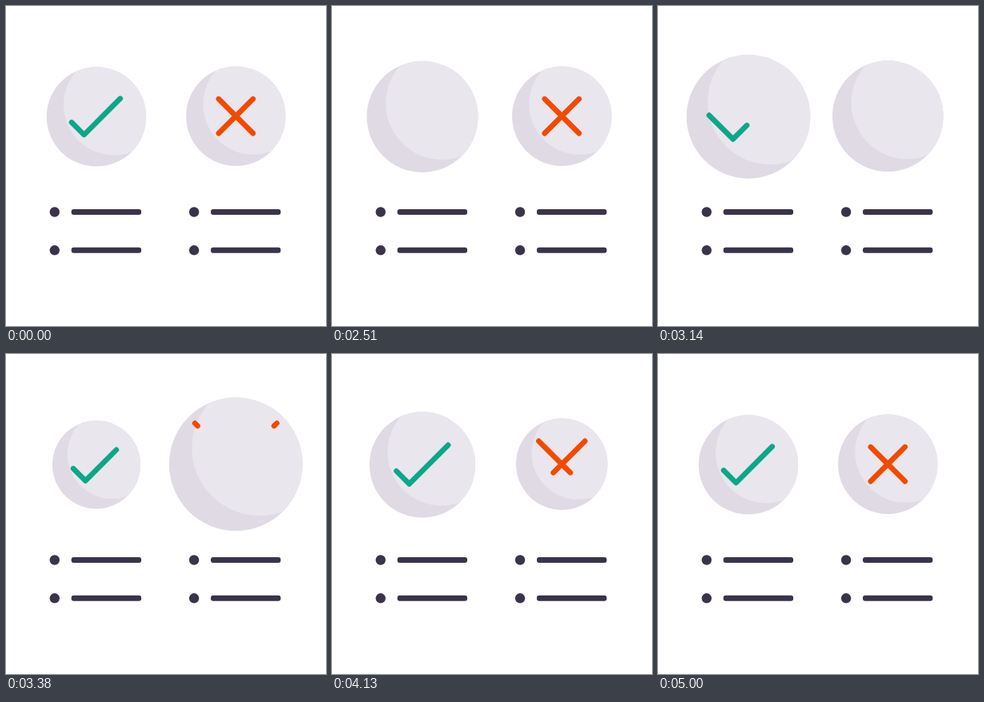
Write an HTML page that moves like this. It is 400 px wide and 400 px high and loops after 5030 ms.

```html
<!DOCTYPE html>
<html lang="en">
<head>
<meta charset="utf-8">
<title>Pros and cons</title>
<style>
  html, body { margin: 0; width: 100%; height: 100%; overflow: hidden; background: #fff; }
  svg { display: block; width: 100%; height: 100%; }
  .shade { fill: #e0dae4; }
  .light { fill: #eae6ed; }
  .mark { fill: none; stroke-width: 6.6; stroke-linecap: round; stroke-linejoin: round; }
  .list { fill: #3a3349; }
</style>
</head>
<body>
<svg viewBox="0 0 400 400">
  <defs>
    <clipPath id="disc"><circle r="62.2"/></clipPath>
    <g id="ball">
      <circle class="shade" r="62.2"/>
      <circle class="light" cx="22" cy="-15" r="63" clip-path="url(#disc)"/>
    </g>
    <g id="item">
      <circle cx="60.8" cy="0" r="6.2"/>
      <rect x="81.7" y="-3.5" width="87.4" height="7" rx="3"/>
    </g>
    <g id="items">
      <use href="#item" y="257.5"/>
      <use href="#item" y="305.3"/>
    </g>
  </defs>
  <use id="yesBall" href="#ball"/>
  <use id="noBall" href="#ball"/>
  <path id="check" class="mark" stroke="#0ca789"/>
  <path id="cross" class="mark" stroke="#f24a00"/>
  <g class="list">
    <use href="#items"/>
    <use href="#items" x="174.3"/>
  </g>
</svg>
<script>
const LOOP = 5030, START = 2030, STEP = 30;
const YES = [113, 138.4], NO = [287.3, 137.7];
const D = Math.SQRT1_2;

// Rows: time, value, optional power that quickens the way in.
const yesSize = [[2030, 62], [2250, 50], [2930, 91, 0.76], [3430, 54], [4000, 67], [4430, 62]];
const noSize = [[2560, 62], [2830, 50], [3580, 87, 0.76], [4110, 57], [4550, 66.5], [5000, 62]];
// How far each mark has slid past its resting place along its own stroke.
const checkSlide = [[2630, -150], [3160, 45], [3500, -14], [3860, 3], [4200, -1], [4600, 0.5], [5000, 0]];
const crossSlide = [[3205, -114], [3790, 48], [4130, -14], [4470, 7], [4800, -2], [5000, 0]];

const el = id => document.getElementById(id);
const clamp = (v, lo, hi) => Math.min(hi, Math.max(lo, v));

function track(keys, t) {
  if (t <= keys[0][0]) return keys[0][1];
  for (let i = 1; i < keys.length; i++) {
    const [t0, v0] = keys[i - 1], [t1, v1, power = 1] = keys[i];
    if (t < t1) {
      const p = ((t - t0) / (t1 - t0)) ** power;
      return v0 + (v1 - v0) * (1 - Math.cos(Math.PI * p)) / 2;
    }
  }
  return keys[keys.length - 1][1];
}

const BEND = 22, CHECK = 86, ARM = 30.4;

function checkPoint(s) {
  const rise = Math.max(0, s - BEND), fall = Math.min(s, BEND);
  return [-31 + (fall + rise) * D, 7 + (fall - rise) * D];
}

function checkPoints(t) {
  let from = 0, to = CHECK;
  if (t >= START && t < 2630) {
    to = CHECK * (1 - (t - 1990) / 470);
  } else if (t >= 2630) {
    const slide = track(checkSlide, t);
    from = Math.max(-12, -slide);
    to = Math.min(98, CHECK - slide);
  }
  if (to <= from) return [];
  const stops = from < BEND && to > BEND ? [from, BEND, to] : [from, to];
  return [stops.map(checkPoint)];
}

function crossPoints(t) {
  let from = -ARM, to = ARM;
  if (t >= 2520 && t < 3205) {
    from += 2 * ARM * (t - 2520) / 470;
  } else if (t >= 3205) {
    const slide = track(crossSlide, t);
    from = clamp(slide - ARM, -54, 54);
    to = clamp(slide + ARM, -54, 54);
  }
  if (to <= from) return [];
  return [1, -1].map(side => [from, to].map(s => [side * s * D, s * D]));
}

function drawSide(ball, mark, [x, y], radius, lines) {
  const k = radius / 62;
  el(ball).setAttribute("transform", `translate(${x} ${y}) scale(${k})`);
  const place = ([px, py]) => `${(x + px * k).toFixed(2)} ${(y + py * k).toFixed(2)}`;
  el(mark).setAttribute("d", lines.map(line => "M" + line.map(place).join("L")).join(""));
}

function draw(now) {
  const raw = now % LOOP;
  const t = raw < START ? 0 : START + Math.floor((raw - START) / STEP) * STEP;
  drawSide("yesBall", "check", YES, track(yesSize, t), checkPoints(t));
  drawSide("noBall", "cross", NO, track(noSize, t), crossPoints(t));
}

const begin = performance.now();
function tick() {
  draw(performance.now() - begin);
  requestAnimationFrame(tick);
}
tick();
</script>
</body>
</html>
```
